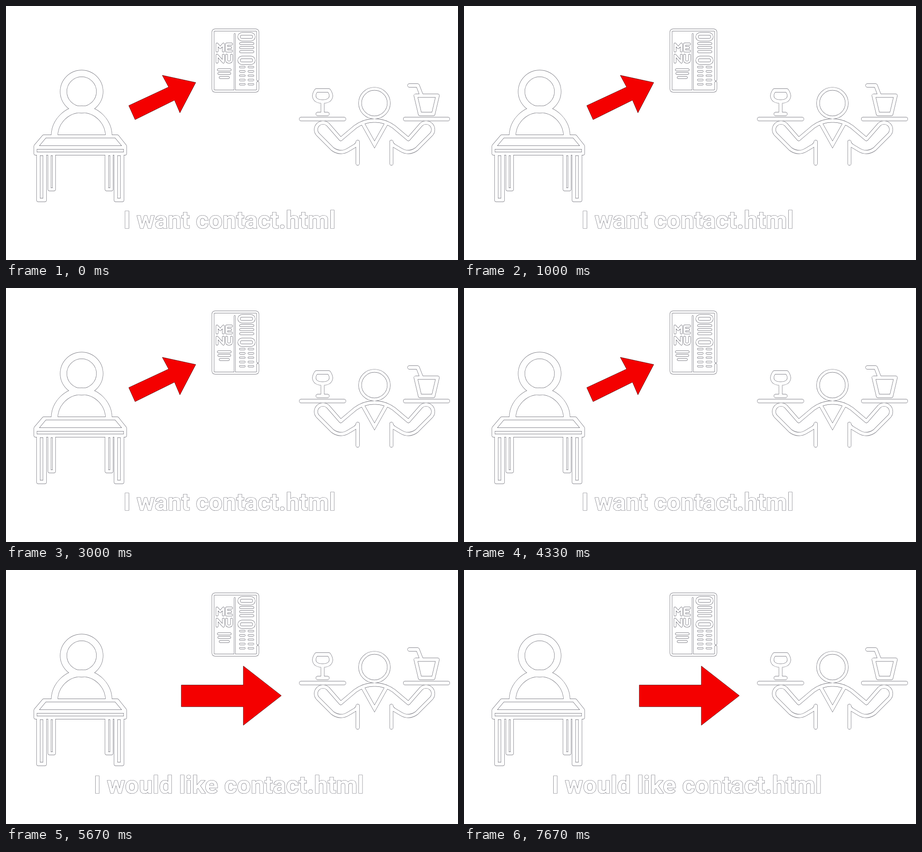
Write an HTML page that moves like this. It is 998x561 px and loops after 8 s.

```html
<!DOCTYPE html>
<html lang="en">
<head>
<meta charset="utf-8">
<title>Ordering from the menu</title>
<style>
html, body { margin: 0; width: 100%; height: 100%; overflow: hidden; background: #fff; }
svg { display: block; width: 100vw; height: 100vh; }
/* The art is painted twice: a slightly wider grey pass, then a white pass on top. */
.edge { --extra: 1.3px; --ink: #5a5a64; }
.face { --extra: 0px; --ink: #fefefe; }
.line { fill: none; stroke: var(--ink); stroke-width: calc(var(--w) + var(--extra)); stroke-linecap: round; stroke-linejoin: round; }
.solid { fill: var(--ink); fill-rule: evenodd; stroke: var(--ink); stroke-width: var(--extra); stroke-linejoin: round; }
.sharp { stroke-linecap: butt; stroke-linejoin: miter; }
.w2 { --w: 2px; }
.w3 { --w: 3px; }
.w4 { --w: 4px; }
.w5 { --w: 5px; }
.w6 { --w: 6px; }
.w7 { --w: 7px; }
.w14 { --w: 14px; }
.arrow { fill: #f40000; stroke: #300; stroke-width: .7; }
text { font: 700 54.1px Roboto, Arial, sans-serif; text-anchor: middle; fill: #fefefe; stroke: #5a5a64; stroke-width: 1.2px; paint-order: stroke; }
</style>
</head>
<body>
<svg viewBox="0 0 998 561" preserveAspectRatio="none">
  <defs>
    <g id="guest">
      <circle class="line w14" cx="167" cy="189" r="40"/>
      <path class="line w14 sharp" d="M107 288a60 60 0 0 1 120 0"/>
    </g>

    <g id="table">
      <path class="solid" d="M93 329H109V405q0 3-3 3H96q-3 0-3-3ZM99 330V402H103V330Z"/>
      <path class="solid" d="M219 329H236V405q0 3-3 3H222q-3 0-3-3ZM226 330V402H230V330Z"/>
      <path class="solid" d="M68 329H89V429q0 3-3 3H71q-3 0-3-3ZM75 330V425H82V330Z"/>
      <path class="solid" d="M239 329H260V429q0 3-3 3H242q-3 0-3-3ZM246 330V425H253V330Z"/>
      <path class="solid" d="M83 285H246q2 0 3 2L265 307q1 1 1 3V326q0 3-3 3H65q-3 0-3-3V310q0-2 1-3L80 287q1-2 3-2ZM88 291L73 309H256L241 291ZM68 316V323H260V316Z"/>
    </g>

    <g id="menu">
      <path class="line w4" d="M556 163V58q0-5-5-5H462q-5 0-5 5V183q0 5 5 5H551q5 0 5-5V169"/>
      <path class="line w2" d="M505 62V187"/>
      <rect class="line w5" x="514.5" y="61.5" width="33" height="13" rx="6.5"/>
      <rect class="line w5" x="514.5" y="113.5" width="33" height="13" rx="6.5"/>
      <path class="line w4" d="M518 83H545M518 92H545M518 101H545M469 141H495M470 149H494M473 158H491"/>
      <path class="line w3" d="M517 135H526.5M536 135H545.5M517 144.5H526.5M536 144.5H545.5M517 154H526.5M536 154H545.5M517 163.5H526.5M536 163.5H545.5M517 173H526.5M536 173H545.5"/>
      <path class="line w4" d="M466 99.5V84L473 92L480 84V99.5M498 84H487V99.5H498M487 92H496M466 124V108.5L480 124V108.5M487 108.5V119q0 5 5.5 5t5.5-5V108.5"/>
    </g>

    <g id="arm">
      <path class="line w7" d="M814 253Q790 253 771 267L739 294L711 262A15.5 15.5 0 0 0 689 284L721 316Q738 328 755 318L770 309Q776 305 776.5 300V348"/>
      <rect class="solid" x="648" y="246" width="102" height="7.5" rx="3.5"/>
    </g>

    <g id="waiter">
      <circle class="line w6" cx="813.5" cy="214.5" r="31.7"/>
      <use href="#arm"/>
      <use href="#arm" transform="matrix(-1 0 0 1 1627.5 0)"/>
      <path class="line w7 sharp" d="M788 260L813.7 306L839.5 260"/>
    </g>

    <g id="drinks">
      <path class="line w7" d="M685 186.5H713C716 191 718 196 717.5 200C716 208 709 211 699 211C689 211 682 208 680.5 200C680 196 682 191 685 186.5Z"/>
      <path class="line w7" d="M699 212V238M688 238.5H710"/>
      <path class="line w7" d="M904.5 198H953L943.5 238.5H914Z"/>
      <path class="line w7" d="M890.5 175.5H909L917 196"/>
    </g>

    <g id="art">
      <use href="#guest"/>
      <use href="#table"/>
      <use href="#menu"/>
      <use href="#waiter"/>
      <use href="#drinks"/>
    </g>
  </defs>

  <use class="edge" href="#art"/>
  <use class="face" href="#art"/>

  <g id="want">
    <path class="arrow" d="M271 220L359 179L345 153L419 169L384 236L372 208L285 251Z"/>
    <text x="493.5" y="490.5">I want contact.html</text>
  </g>
  <g id="like" opacity="0">
    <path class="arrow" d="M387 254H524V212L608 277.5L524 343V302H387Z"/>
    <text x="492" y="493">I would like contact.html</text>
  </g>
</svg>
<script>
const LOOP = 8000;
const SWITCH = 5000 / LOOP;

function cut(id, before, after) {
  document.getElementById(id).animate([
    { opacity: before, offset: 0 },
    { opacity: before, offset: SWITCH },
    { opacity: after, offset: SWITCH },
    { opacity: after, offset: 1 }
  ], { duration: LOOP, iterations: Infinity });
}

cut("want", 1, 0);
cut("like", 0, 1);
</script>
</body>
</html>
```
